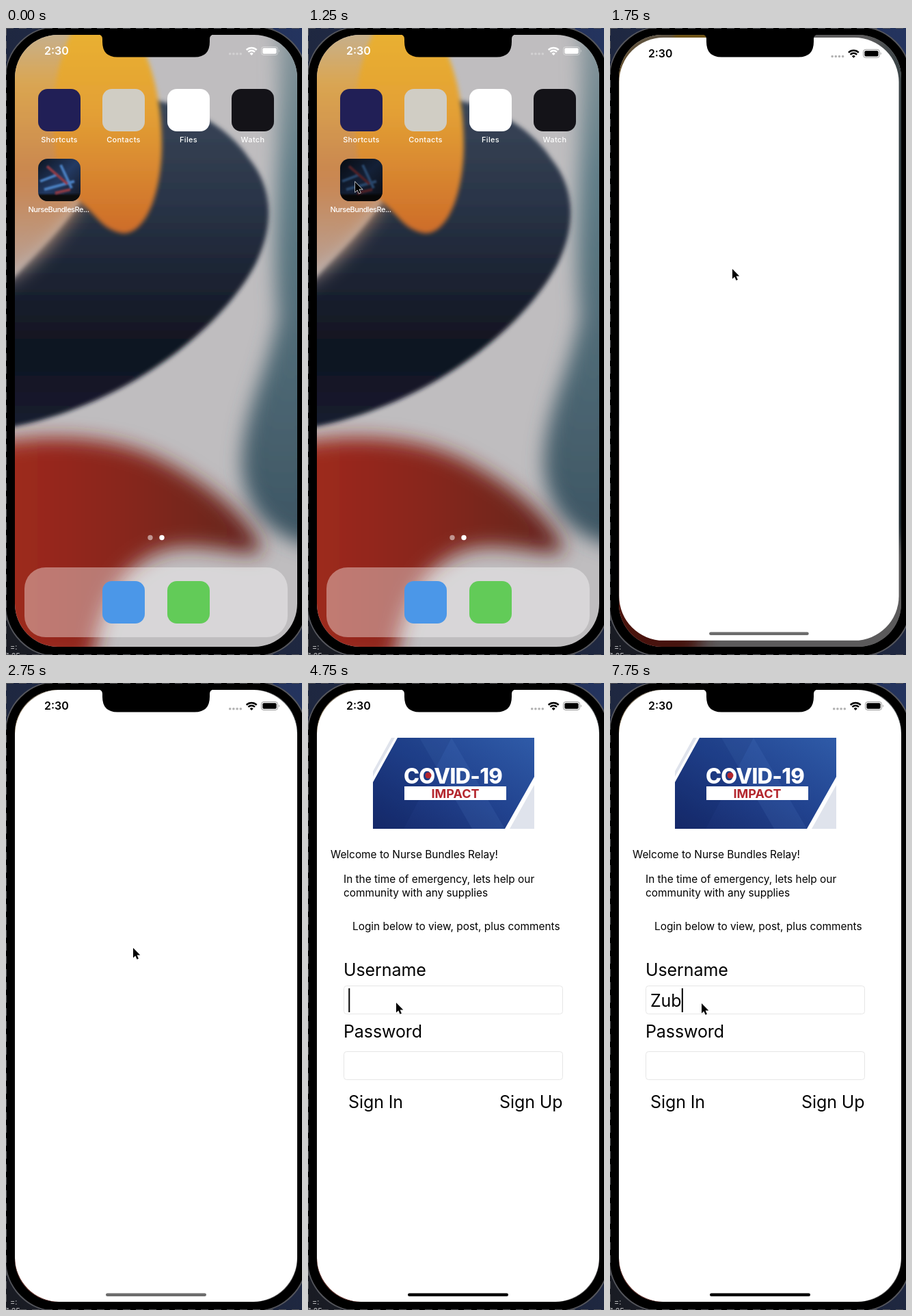
An HTML page that plays this animation: 433x916 px, repeating every 8000 ms.

```html
<!DOCTYPE html>
<html lang="en">
<head>
<meta charset="utf-8">
<title>App launch, then sign in</title>
<style>
  html, body { margin: 0; height: 100%; overflow: hidden; background: #000; }
  svg { display: block; width: 100vw; height: 100vh; }
  text { font-family: Inter, "Liberation Sans", sans-serif; white-space: pre; }
  .label { font-size: 11px; font-weight: 500; letter-spacing: .3px; fill: #fff; text-anchor: middle; }
  .body { font-size: 15.4px; }
  .large { font-size: 25px; letter-spacing: -.1px; }
</style>
</head>
<body>
<svg viewBox="0 0 433 916">
  <defs>
    <clipPath id="screen"><rect x="13" y="10" width="413" height="894" rx="63"/></clipPath>
    <clipPath id="tile"><rect x="47" y="191" width="62" height="62" rx="14"/></clipPath>
    <filter id="soft1"><feGaussianBlur stdDeviation="1"/></filter>
    <filter id="soft3"><feGaussianBlur stdDeviation="3"/></filter>
    <filter id="soft14" x="-30%" y="-30%" width="160%" height="160%"><feGaussianBlur stdDeviation="14"/></filter>
    <linearGradient id="amber" x1="0" y1="0" x2="0" y2="1">
      <stop offset="0" stop-color="#eab430"/><stop offset=".45" stop-color="#e3a035"/><stop offset="1" stop-color="#cd6c2a"/>
    </linearGradient>
    <linearGradient id="navy" x1="0" y1="0" x2="0" y2="1">
      <stop offset="0" stop-color="#3a4658"/><stop offset=".3" stop-color="#2a3548"/>
      <stop offset=".75" stop-color="#101420"/><stop offset="1" stop-color="#151c30"/>
    </linearGradient>
    <linearGradient id="teal" x1="0" y1="0" x2="0" y2="1">
      <stop offset="0" stop-color="#8b989d"/><stop offset=".3" stop-color="#607d87"/><stop offset="1" stop-color="#3c5462"/>
    </linearGradient>
    <linearGradient id="red">
      <stop offset="0" stop-color="#a32a1b"/><stop offset=".5" stop-color="#88261a"/><stop offset="1" stop-color="#62241b"/>
    </linearGradient>
    <linearGradient id="haze" x1="0" y1="0" x2="0" y2="1">
      <stop offset="0" stop-color="#bdb3a4"/><stop offset=".25" stop-color="#dba650"/>
      <stop offset=".6" stop-color="#c9854f"/><stop offset="1" stop-color="#b5a5a2"/>
    </linearGradient>
    <linearGradient id="banner" x1="0" y1="1" x2="1" y2="0">
      <stop offset="0" stop-color="#16296a"/><stop offset=".5" stop-color="#21428e"/><stop offset="1" stop-color="#2f5ba8"/>
    </linearGradient>
    <linearGradient id="photo" x1="0" y1="0" x2="1" y2="1">
      <stop offset="0" stop-color="#0d1420"/><stop offset=".5" stop-color="#233a63"/><stop offset="1" stop-color="#14161f"/>
    </linearGradient>
    <linearGradient id="backdrop" x1="0" y1="1" x2="1" y2="0">
      <stop offset="0" stop-color="#191b22"/><stop offset="1" stop-color="#24345f"/>
    </linearGradient>
    <g id="status">
      <text x="56" y="39" font-size="16" font-weight="600" fill="currentColor">2:30</text>
      <path d="M327.7 37.7h16" stroke="currentColor" stroke-width="3.6" stroke-linecap="round" stroke-dasharray="0 5.2" opacity=".3"/>
      <g fill="none" stroke="currentColor" stroke-width="2.5">
        <path d="M351.7 32a10.6 10.6 0 0 1 15 0M354.4 35a6.6 6.6 0 0 1 9.6 0"/>
        <path d="M359.2 40l-2.5-2.6a3.5 3.5 0 0 1 5 0z" fill="currentColor" stroke="none"/>
        <rect x="373.5" y="27.5" width="24" height="12" rx="3.5" stroke-width="1" opacity=".4"/>
      </g>
      <path d="M399 31.5q2 2 0 4z" fill="currentColor" opacity=".4"/>
      <rect x="375.3" y="29.3" width="20.4" height="8.4" rx="2" fill="currentColor"/>
    </g>
  </defs>

  <rect width="433" height="916" fill="url(#backdrop)"/>
  <g fill="#c9c9cc" font-size="11">
    <text x="6" y="908">=:</text><text x="0" y="921">1.25</text>
  </g>
  <rect x="-1" y="-2" width="441" height="920" rx="76" stroke="#55565c" stroke-width="2"/>
  <path d="M.5 0V916M0 .5H433M0 915.5H433" stroke="#55565a" stroke-dasharray="11 8" fill="none"/>

  <g clip-path="url(#screen)">
    <rect x="13" y="10" width="413" height="894" fill="#bfbdbf"/>
    <g id="wallpaper">
      <path d="M395 -20C410 120 385 300 398 420C385 500 345 560 345 640C350 700 380 745 460 760V-20Z" fill="url(#teal)" filter="url(#soft14)"/>
      <path d="M-30 610C60 590 160 595 235 635C310 675 365 725 375 765C340 775 280 745 225 765C165 790 140 840 125 930H-30Z" fill="url(#red)" filter="url(#soft14)"/>
      <path d="M-20 400C30 340 80 300 110 250L200 105C260 105 325 145 355 190C392 235 392 290 365 345C315 440 170 560 -20 588Z" fill="url(#navy)" filter="url(#soft3)"/>
      <path d="M-20 -20H130V235C95 265 60 345 -20 378Z" fill="url(#haze)" filter="url(#soft14)"/>
      <path d="M110 -20H165C205 15 228 90 228 170C228 240 205 300 172 300C140 296 130 270 105 250C85 235 70 200 70 150C65 80 85 20 110 -20Z" fill="url(#amber)" filter="url(#soft3)"/>
      <use href="#status" color="#fff"/>
    </g>
    <g id="springboard">
      <circle cx="211" cy="744.5" r="3.7" fill="#fff" opacity=".5"/>
      <circle cx="228" cy="744.5" r="3.7" fill="#fff"/>
      <rect x="27" y="788" width="385" height="102" rx="31" fill="#fff" opacity=".38"/>
      <g id="icons"></g>
      <g clip-path="url(#tile)">
        <rect x="47" y="191" width="62" height="62" fill="url(#photo)"/>
        <g filter="url(#soft1)" fill="none" stroke-width="4">
          <path d="M50 224l26-10M80 200l16 34M56 236l44-12" stroke="#4a7fc0"/>
          <path d="M60 202l30 26M72 241l22-5" stroke="#8d3a44"/>
          <path d="M47 250h62" stroke="#08090d" stroke-width="14"/>
        </g>
        <rect id="press" x="47" y="191" width="62" height="62" opacity=".45"/>
      </g>
      <text class="label" x="77" y="269" style="letter-spacing:-.5px">NurseBundlesRe...</text>
    </g>

    <g id="app">
      <rect x="13" y="10" width="413" height="894" opacity=".52"/>
      <rect id="pane" rx="65" fill="#fff"/>
      <g id="content">
        <use href="#status"/>
        <g id="login">
          <path d="M122 80h5L95 137v-8ZM331 149v64h-36Z" fill="#dfe3ec"/>
          <path d="M131 80H331V137L288 213H95V145Z" fill="url(#banner)"/>
          <path d="M163 80L240 213H288L210 80Z" fill="#6f9be0" opacity=".1"/>
          <path d="M210 80L140 213H95V145L131 80Z" fill="#0c1c58" opacity=".14"/>
          <text x="140" y="146.5" font-size="31" font-weight="800" letter-spacing="-.7" fill="#fff">COVID-19</text>
          <circle cx="176" cy="135" r="4.5" fill="#b3262d"/>
          <rect x="141" y="151" width="149" height="20" fill="#fff"/>
          <text x="215.5" y="167.5" font-size="18" font-weight="700" text-anchor="middle" fill="#b3262d">IMPACT</text>
          <g class="body">
            <text x="33" y="256">Welcome to Nurse Bundles Relay!</text>
            <text x="52" y="292">In the time of emergency, lets help our</text>
            <text x="52" y="311.5">community with any supplies</text>
            <text x="65" y="361">Login below to view, post, plus comments</text>
          </g>
          <g fill="#fff" stroke="#e6e6e6">
            <rect x="52.5" y="442.5" width="320" height="41" rx="4"/>
            <rect x="52.5" y="538.5" width="320" height="41" rx="4"/>
          </g>
          <g class="large">
            <text x="52" y="428">Username</text>
            <text x="52" y="518">Password</text>
            <text x="59" y="621">Sign In</text>
            <text x="280" y="621">Sign Up</text>
            <text id="typed" x="59" y="473"></text>
          </g>
          <rect id="caret" y="446" width="2" height="35"/>
        </g>
      </g>
      <rect id="homeBar" x="146" y="891.5" width="147" height="4.6" rx="2.3"/>
    </g>
  </g>
  <path d="M135 9.5Q141 10 141 16V20Q141 42.5 163 42.5H276Q298 42.5 298 20V16Q298 10 304 9.5Z"/>
  <path id="cursor" d="M0 0V14.5L3.3 11.5 5.6 16.8 7.9 15.8 5.6 10.6H10.3Z" stroke="#fff" stroke-width="1.2" paint-order="stroke"/>
</svg>
<script>
const LOOP = 8000, STEP = 250;
const LAUNCH = 1500, LOGIN = 3500, FOCUS = 4000, TYPING = 7250;
const NAME = "Zub";
const $ = id => document.getElementById(id);
const mix = (a, b, k) => a + (b - a) * k;
const show = (id, on) => $(id).setAttribute("display", on ? "inline" : "none");
const set = (id, attrs) => {
  for (const key in attrs) $(id).setAttribute(key, attrs[key]);
};

// time, x, y of the pointer tip
const pointerPath = [
  [250, -14, 290], [1000, 69, 225], [1250, 69, 225], [1500, 161, 291],
  [1750, 179, 352], [2250, 184, 388], [2750, 186, 387], [3250, 186, 387],
  [4000, 129, 467], [5000, 129, 467], [5750, 134, 468], [LOOP, 134, 468]
];

const icons = [
  [47, 89, "#211f56", "Shortcuts"], [141, 89, "#d0cdc4", "Contacts"],
  [236, 89, "#fff", "Files"], [330, 89, "#141318", "Watch"],
  [141, 808, "#4b97e8", ""], [236, 808, "#62cb58", ""]
];
$("icons").innerHTML = icons.map(([x, y, color, name]) =>
  `<rect x="${x}" y="${y}" width="62" height="62" rx="14" fill="${color}"/>
   <text class="label" x="${x + 31}" y="${y + 77.5}">${name}</text>`).join("");

function pointerAt(t) {
  const i = pointerPath.findIndex(p => p[0] > t);
  if (i < 1) return [-20, 290];
  const [t0, x0, y0] = pointerPath[i - 1], [t1, x1, y1] = pointerPath[i];
  const k = (t - t0) / (t1 - t0);
  return [mix(x0, x1, k), mix(y0, y1, k)];
}

function drawWindow(t) {
  const open = 1 - 0.15 ** ((t - LAUNCH) / 250);
  const x = mix(15, 13, open), y = mix(37, 10, open);
  const width = mix(388, 413, open), height = mix(806, 894, open);
  const scale = width / 413;
  const place = (top, anchor) => `translate(${x} ${top}) scale(${scale}) translate(-13 ${-anchor})`;
  set("pane", { x, y, width, height });
  set("content", { transform: place(y, 10) });
  set("homeBar", { transform: place(y + height, 904), fill: t < LOGIN ? "#6c6c6c" : "#000" });
}

function drawCaret(t) {
  const typed = t < TYPING ? "" : NAME.slice(0, 1 + Math.floor((t - TYPING) / 250));
  $("typed").textContent = typed;
  const phase = (t + 250) % 1000;
  const blink = phase < 500 ? 1 : phase < 750 ? 0.75 : 0;
  set("caret", {
    x: 59.3 + (typed && $("typed").getComputedTextLength()),
    opacity: t < FOCUS ? 0 : typed ? 1 : blink
  });
}

function draw(t) {
  const launched = t >= LAUNCH;
  show("springboard", !launched);
  show("press", t >= 1250);
  show("app", launched);
  show("login", t >= LOGIN);
  if (launched) drawWindow(t);
  drawCaret(t);
  set("cursor", { transform: `translate(${pointerAt(t)})` });
}

let last = -1;
function tick() {
  const t = Math.floor(performance.now() % LOOP / STEP) * STEP;
  if (t !== last) draw(last = t);
  requestAnimationFrame(tick);
}
tick();
</script>
</body>
</html>
```
